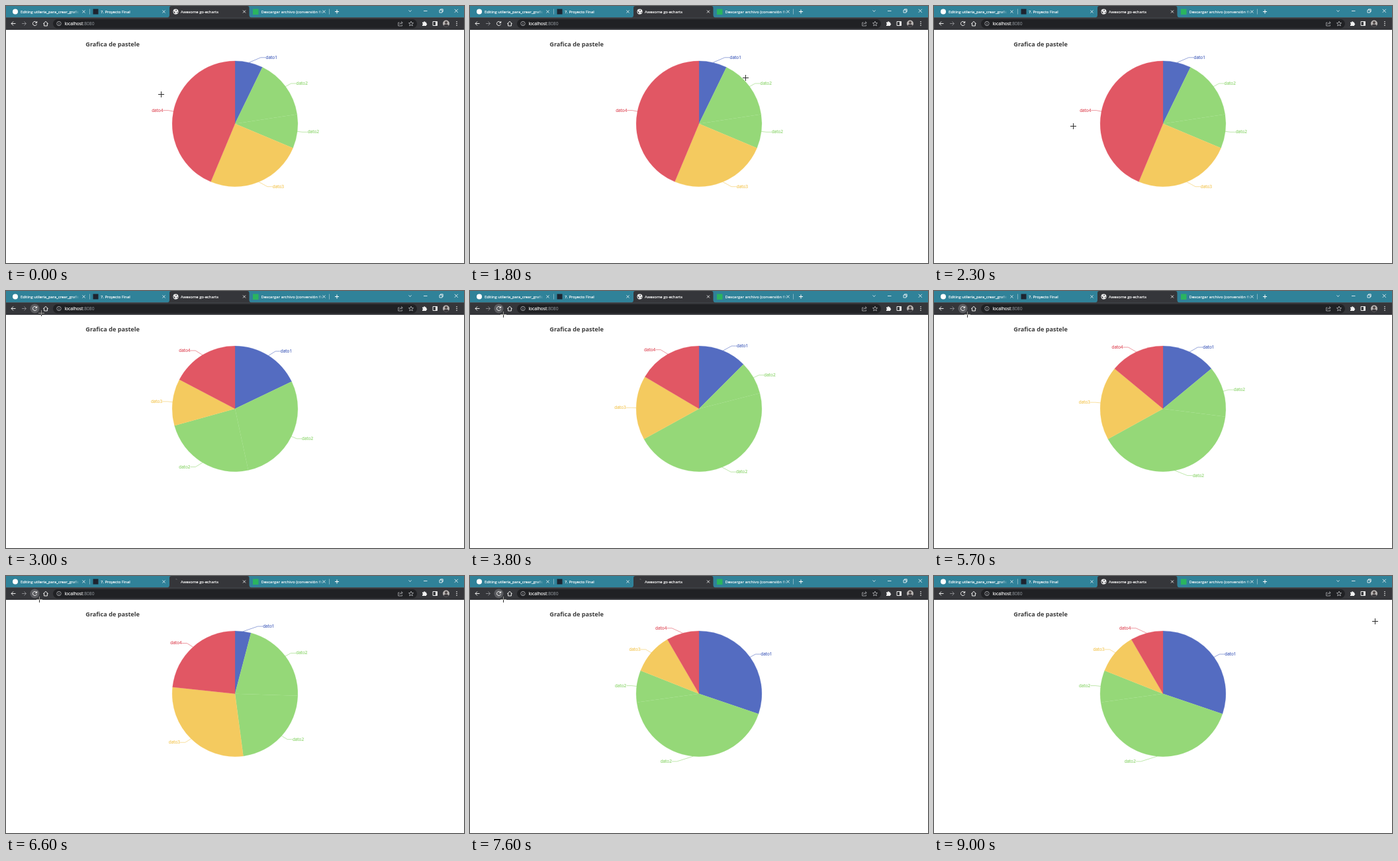
These frames come from a looping animation (692 px wide and 388 px high, 9100 ms). An HTML page:

```html
<!DOCTYPE html>
<html lang="es">
<head>
<meta charset="utf-8">
<title>Awesome go-echarts</title>
<style>
  html, body { margin: 0; width: 100%; height: 100%; overflow: hidden; background: #fff; }
  svg { display: block; width: 692px; height: 388px; font-family: "Open Sans", "Noto Sans", sans-serif; }
  .tab { font-size: 5.87px; fill: #fff; stroke: #fff; stroke-width: .15; }
  .url { font-size: 6.7px; fill: #fff; }
  .title { font-size: 9.1px; font-weight: 700; fill: #3c3c3c; }
  .label { font-size: 6.4px; stroke-width: .2; }
  .line { fill: none; stroke-width: .6; }
  .sector { stroke-width: .25; }
  .icon { fill: none; stroke: #eee; stroke-width: 1; }
  .thin { fill: none; stroke: #fff; stroke-width: .8; }
  #cursor { mix-blend-mode: difference; fill: #d0d0d0; }
</style>
</head>
<body>
<svg viewBox="0 0 692 388">
  <defs>
    <linearGradient id="fade"><stop offset=".88" stop-color="#fff"/><stop offset="1" stop-color="#fff" stop-opacity="0"/></linearGradient>
    <mask id="cut1"><rect x="20" width="91" height="17" fill="url(#fade)"/></mask>
    <mask id="cut4"><rect x="384" width="97" height="17" fill="url(#fade)"/></mask>
    <clipPath id="face"><circle cx="665" cy="26.5" r="5"/></clipPath>
    <path id="x" d="M-2-2L2 2M2-2L-2 2"/>
  </defs>
  <rect width="692" height="388" fill="#fff"/>

  <!-- tab strip -->
  <rect width="692" height="17.5" fill="#308299"/>
  <path d="M243 17.5Q247 17.5 247 13.5V3Q247 0 250 0H364.5Q367.5 0 367.5 3V13.5Q367.5 17.5 371.5 17.5Z" fill="#35363a"/>
  <rect y="17.2" width="692" height="18.8" fill="#35363a"/>
  <circle cx="14" cy="8.5" r="4" fill="#fff"/>
  <rect x="131.5" y="4.5" width="8" height="8" fill="#1e2430"/>
  <rect x="373" y="4.5" width="8.5" height="8.5" fill="#2bb45f"/>
  <g id="globe">
    <circle cx="256.5" cy="8.5" r="4" fill="#f1f1f1"/>
    <path d="M253.5 7.8L255.500 9.500V11.300Q253 10.800 253.500 7.800ZM256.500 6L258.300 5.800L257.600 7.300L256 7.500ZM258 9.200L259.600 8.800Q259.500 10.300 258.400 11Z" fill="#35363a"/>
  </g>
  <path id="spinner" class="thin" d="M256.5 4.7A3.800 3.800 0 0 1 258.500 5.300" stroke-opacity=".35"/>
  <g class="tab">
    <text x="22" y="10.6" mask="url(#cut1)">Editing utileria_para_crear_grafica</text>
    <text x="143" y="10.6">7. Proyecto Final</text>
    <text x="264" y="10.6">Awesome go-echarts</text>
    <text x="385.5" y="10.6" letter-spacing=".12" mask="url(#cut4)">Descargar archivo (conversión fin</text>
  </g>
  <g class="thin">
    <use href="#x" x="117.5" y="8.5"/><use href="#x" x="238.5" y="8.5"/>
    <use href="#x" x="360" y="8.5"/><use href="#x" x="480.5" y="8.5"/>
    <path d="M126.5 4.5V12.5M488.5 4.5V12.5" stroke-opacity=".5"/>
    <path d="M497 8.5H503M500 5.5V11.5" stroke-width="1"/>
    <path d="M608.5 6.5L610.5 8.5L612.5 6.5M631 7.5H636.5M655 6H659V10H655ZM656.5 6V4.8H660.2V8.5H659"/>
    <path d="M677.8 4.8L682.8 9.8M682.8 4.8L677.8 9.8"/>
  </g>

  <!-- toolbar -->
  <rect x="71" y="20" width="550" height="13.5" rx="6.7" fill="#202124"/>
  <circle id="hover" cx="43.5" cy="26.5" r="7" fill="#5b5c60"/>
  <g class="icon">
    <path d="M14.5 26.5H8M11 23.5L8 26.5L11 29.5"/>
    <path d="M24 26.5H30.5M27.5 23.5L30.5 26.5L27.5 29.5" stroke="#85868a"/>
    <path d="M46.3 25A3.1 3.1 0 1 0 46.5 27.5M46.7 23V25.5H44.2"/>
    <path d="M56.300 26.800L60 23.300L63.700 26.800M57.600 26V30H62.400V26"/>
    <g stroke="#c4c6ca" stroke-width=".7">
      <circle cx="80" cy="26.5" r="3.2"/>
      <path d="M80 26V28.5M80 24.5V25.3"/>
      <path d="M594.5 25H592.7V30H598.5V28.5M594.5 28Q595 25.5 598.5 25.3M597 23.3L599.3 25.3L597 27.3"/>
      <path d="M612 23L613 25.5L615.6 25.7L613.6 27.4L614.3 30L612 28.6L609.7 30L610.4 27.4L608.4 25.7L611 25.5Z"/>
    </g>
    <path d="M645 23.5H651.5V29.5H645Z"/>
  </g>
  <path d="M629 24.5H631A1.2 1.2 0 0 1 633.4 24.5H635V26.2A1.2 1.2 0 0 1 635 28.6V30H629V28.3A1 1 0 0 0 629 26.3ZM649 23.5H651.5V29.5H649Z" fill="#f1f1f1"/>
  <g clip-path="url(#face)">
    <rect x="660" y="21" width="10" height="11" fill="#b9b5b3"/>
    <circle cx="665" cy="25" r="2" fill="#4d4545"/>
    <ellipse cx="665" cy="31" rx="4" ry="3.5" fill="#39373b"/>
  </g>
  <g fill="#eee"><circle cx="681" cy="23.8" r=".8"/><circle cx="681" cy="26.5" r=".8"/><circle cx="681" cy="29.2" r=".8"/></g>
  <text class="url" x="88.4" y="28.9"><tspan stroke="#fff" stroke-width=".15">localhost</tspan><tspan fill="#9aa0a6">:8080</tspan></text>

  <!-- page -->
  <text class="title" x="120.3" y="60.8">Grafica de pastele</text>
  <g id="pie"></g>
  <path id="cursor" d="M-4.5-.5H4.5V.5H-4.5ZM-.5-4.5H.5V-.5H-.5ZM-.5.5H.5V4.5H-.5Z"/>
</svg>
<script>
const LOOP = 9100, STEP = 100;
const CX = 346, CY = 177.8, R = 94.9, REACH = 102.6, TAIL = 7.6, CURVE = 108;
const names = ["dato1", "dato2", "dato2", "dato3", "dato4"];
const colors = ["#546cc1", "#95d878", "#95d878", "#f4ca5f", "#e15764"];

// Page loads: first step and shares in percent, the last slice takes the rest
const loads = [
  { from: 0, shares: [7.2, 15.4, 8.7, 25] },
  { from: 27, shares: [17.9, 28.7, 24.1, 12] },
  { from: 37, shares: [12.5, 8.5, 46, 16.5] },
  { from: 46, shares: [18.1, 6.6, 25.4, 34.3] },
  { from: 55, shares: [14, 13, 40, 19] },
  { from: 65, shares: [4.1, 21.4, 22.4, 28.8] },
  { from: 75, shares: [30.2, 42.6, 8.2, 10.6] }
];

// Pointer strokes: steps, goal, and how far the path sags
const strokes = [
  { from: 0, to: 3, x: 236, y: 142, sag: 9 },
  { from: 5, to: 8, x: 223, y: 239, sag: 0 },
  { from: 11, to: 14, x: 326, y: 65, sag: 0 },
  { from: 16, to: 18, x: 416, y: 108, sag: 0 },
  { from: 18, to: 22, x: 262, y: 230, sag: 90 },
  { from: 22, to: 26, x: 53, y: 33, sag: 0 },
  { from: 30, to: 32, x: 50, y: 35, sag: 0 },
  { from: 79, to: 89, x: 666, y: 68, sag: 46 }
];

const $ = id => document.getElementById(id);
const show = (id, on) => $(id).style.display = on ? "" : "none";

function at(turn, r) {
  const a = turn * 2 * Math.PI;
  return [CX + r * Math.sin(a), CY - r * Math.cos(a)];
}

function add(tag, attrs) {
  const el = document.createElementNS("http://www.w3.org/2000/svg", tag);
  for (const key in attrs) el.setAttribute(key, attrs[key]);
  return $("pie").appendChild(el);
}

const slices = names.map((name, i) => {
  const paint = { fill: colors[i], stroke: colors[i] };
  const sector = add("path", { class: "sector", ...paint });
  const line = add("polyline", { class: "line", stroke: colors[i] });
  const label = add("text", { class: "label", ...paint });
  label.textContent = name;
  return { sector, line, label };
});

function drawPie(shares, grow) {
  let start = 0;
  slices.forEach(({ sector, line, label }, i) => {
    const end = i < shares.length ? start + shares[i] / 100 : 1;
    const big = +((end - start) * grow > .5);
    sector.setAttribute("d", `M${CX} ${CY}L${at(start * grow, R)}A${R} ${R} 0 ${big} 1 ${at(end * grow, R)}Z`);

    // Labels sit on an ellipse slightly taller than the pie
    const mid = (start + end) / 2;
    const side = mid < .5 ? 1 : -1;
    const y = at(mid, REACH)[1];
    const bend = CX + side * REACH * Math.sqrt(1 - ((y - CY) / CURVE) ** 2);
    const tip = bend + side * TAIL;
    line.setAttribute("points", `${at(mid, R)} ${bend},${y} ${tip},${y}`);
    label.setAttribute("x", tip + side * .2);
    label.setAttribute("y", y + 2);
    label.setAttribute("text-anchor", side > 0 ? "start" : "end");
    line.style.opacity = label.style.opacity = grow;
    start = end;
  });
}

function pointer(step) {
  let x = 234, y = 133;
  for (const s of strokes) {
    const k = Math.min(1, Math.max(0, (step - s.from) / (s.to - s.from)));
    x += (s.x - x) * k;
    y += (s.y - y) * k + s.sag * 4 * k * (1 - k);
  }
  return [x, y].map(v => Math.round(v) + .5);
}

function draw(step) {
  const load = loads.filter(l => l.from <= step).pop();
  const age = load.from ? step - load.from : Infinity;
  drawPie(load.shares, age ? 1 : .5);
  const busy = age < (step > 60 ? 2 : 1);
  show("globe", !busy);
  show("spinner", busy);
  show("hover", step >= 26 && step < 80);
  $("cursor").setAttribute("transform", `translate(${pointer(step)})`);
}

let shown = -1;
const start = performance.now();
function tick() {
  const step = Math.floor((performance.now() - start) % LOOP / STEP);
  if (step !== shown) draw(shown = step);
  requestAnimationFrame(tick);
}
tick();
</script>
</body>
</html>
```
